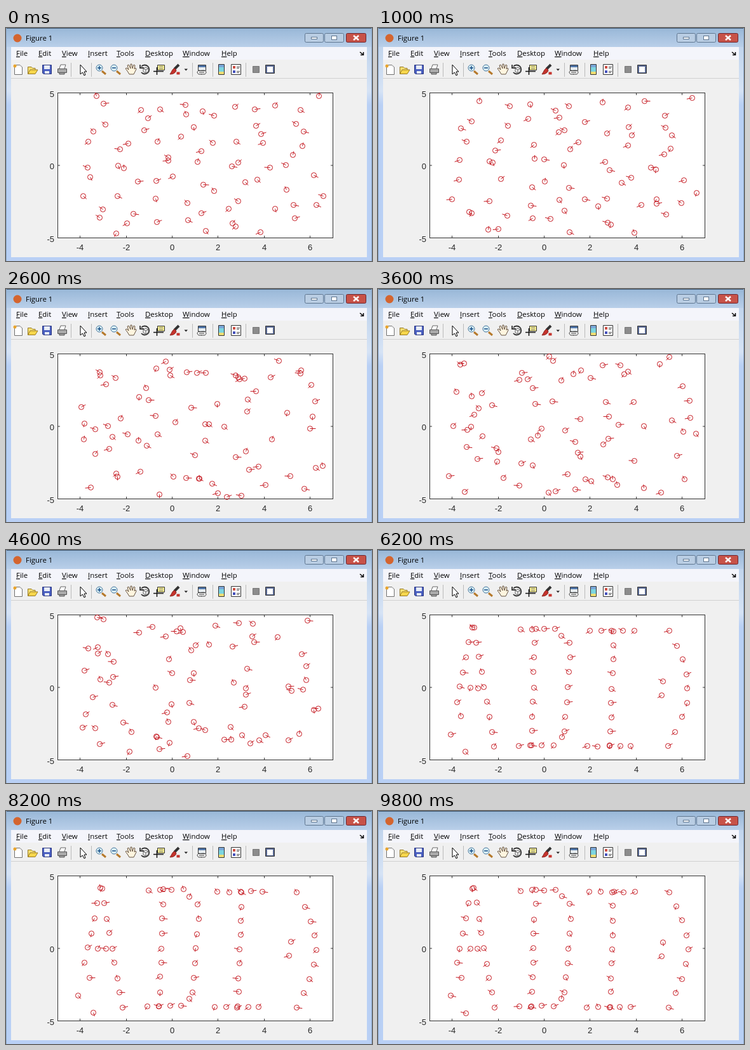
An HTML page for the animation above (10000 ms loop, 576 by 368 pixels).

```html
<!DOCTYPE html>
<html lang="en">
<head>
<meta charset="utf-8">
<title>Figure 1</title>
<style>
  html, body { margin: 0; width: 100%; height: 100%; overflow: hidden; }
  svg { display: block; }
  .ui { font: 11.4px "Open Sans", "Noto Sans", sans-serif; fill: #000; }
  .axis { font: 13px "Liberation Sans", Arial, sans-serif; fill: #262626; }
  .line { fill: none; stroke: #333; }
</style>
</head>
<body>
<svg width="576" height="368" viewBox="0 0 576 368">
  <defs>
    <linearGradient id="bar" x2="0" y2="1">
      <stop stop-color="#98b7d7"/><stop offset="1" stop-color="#b9cfe9"/>
    </linearGradient>
    <linearGradient id="side" x2="0" y2="1">
      <stop stop-color="#b9cfe9"/><stop offset=".27" stop-color="#d6e3f5"/>
      <stop offset=".33" stop-color="#b9d0f5"/><stop offset="1" stop-color="#b9d0f5"/>
    </linearGradient>
  </defs>

  <!-- Window frame -->
  <rect width="576" height="368" fill="url(#side)"/>
  <rect width="576" height="30" fill="url(#bar)"/>
  <path d="M0 .5H576" stroke="#3f566e"/>
  <path d="M.5 0V368M575.5 0V368" stroke="#8ba6c6"/>
  <rect x="8" y="30" width="560" height="332" fill="#f0f0f0"/>
  <rect x="8" y="30" width="560" height="20" fill="#f4f5fb"/>
  <path d="M8 79.5H568" stroke="#d0d0d0"/>
  <circle cx="18" cy="16" r="6.5" fill="#d4652f"/>
  <text class="ui" x="31" y="20">Figure 1</text>
  <g stroke="#5f7690">
    <rect x="470.500" y="8.500" width="29" height="14" rx="2" fill="#b9cde3"/>
    <rect x="501.500" y="8.500" width="30" height="14" rx="2" fill="#b9cde3"/>
    <rect x="535.500" y="8.500" width="31" height="14" rx="2" fill="#c75248" stroke="#6d2630"/>
    <rect x="480.500" y="14.500" width="9" height="3" fill="#fff"/>
    <rect x="512.500" y="12.500" width="8" height="6" fill="#fff"/>
  </g>
  <path d="M547 12L555 19M555 12L547 19" stroke="#fff" stroke-width="2.500"/>
  <g id="menu" class="ui"></g>
  <path d="M557 38L562 42M562.500 38V42.500H558" fill="none" stroke="#000" stroke-width="1.500"/>

  <!-- Toolbar -->
  <path d="M102.500 55V77M134.500 55V77M293.500 55V77M325.500 55V77M377.500 55V77" stroke="#bbb"/>
  <g class="line">
    <path d="M13.500 58.500H22L25.500 62V73.500H13.500Z" fill="#fff" stroke="#707070"/>
    <circle cx="14" cy="60" r="2.500" fill="#e8a52e" stroke="none"/>
    <path d="M34.500 72.500V61.500H40L42 63.500H46V66" fill="#f4df72" stroke="#987923"/>
    <path d="M34.500 72.500L38 66H50L46 72.500Z" fill="#f7d74c" stroke="#987923"/>
    <path d="M57.500 58.500H71.500V72.500H59L57.500 71Z" fill="#4a5fc0" stroke="#2b3780"/>
    <path d="M60 59H69V65H60ZM61 68H68V72H61Z" fill="#e8edf5" stroke="none"/>
    <path d="M84 64L86 58H94L92 64" fill="#fff" stroke="#666"/>
    <path d="M81.500 64.500H95.500V70.500H81.500ZM84 70V73H92V70" fill="#aaa" stroke="#555"/>
    <path d="M117 58V73L120.500 70L123 75L125 74L123 69H127Z" fill="#fff" stroke="#000"/>
    <g id="zooms"></g>
    <path d="M191 68L188 64L190 63L193 66L191 59L193 58L196 64V57H198L199 64L201 58L203 59L202 65L204 63L205 65L201 73H194Z" fill="#fff5df" stroke="#665443"/>
    <path d="M213 61A7 7 0 1 1 213 70M211 58V63H217" stroke="#333" stroke-width="1.800"/>
    <path d="M216 64L220 62L224 64V69L220 71L216 69ZM216 64L220 66L224 64M220 66V71" stroke="#666"/>
    <path d="M238.500 58.500H249.500V66.500H238.500Z" fill="#f5ec8e"/>
    <path d="M241 61H247M241 64H247" stroke="#777"/>
    <path d="M237.500 62V74M232 68.500H248" stroke="#111" stroke-width="1.500"/>
    <path d="M272 58L265 65" stroke="#333" stroke-width="4"/>
    <path d="M266 64Q263 63 260 70L258 73Q266 73 268 67Z" fill="#c5332c" stroke="#8a211c"/>
    <path d="M268.500 69.500H273.500V73.500H268.500Z" fill="#c5332c" stroke="none"/>
    <path d="M280.500 64.500H286L283.250 67.500Z" fill="#222" stroke="none"/>
    <path d="M302.500 58.500H314.500V67.500H302.500Z" fill="#e9eff3"/>
    <path d="M303 60.500H314" stroke="#4f75a8" stroke-width="3"/>
    <path d="M306 67H303Q299 70 303 73H308M307 67H313Q317 70 313 73H307M304 70H312" stroke="#444"/>
    <path d="M334.500 57.500H343.500V73.500H334.500Z" fill="#7cd5e0"/>
    <path d="M335 58H343V62H335Z" fill="#79a7d9" stroke="none"/>
    <path d="M335 69H343V73H335Z" fill="#f0df74" stroke="none"/>
    <path d="M354.500 57.500H369.500V73.500H354.500Z" fill="#fff"/>
    <path d="M357 60H361V64H357Z" fill="#cf5044" stroke="none"/>
    <path d="M357 67H361V71H357Z" fill="#4653bd" stroke="none"/>
    <path d="M363 61.500H368M363 63.500H367M363 68.500H368M363 70.500H367" stroke="#555"/>
    <path d="M388.500 60.500H398.500V70.500H388.500Z" fill="#8c8c8c" stroke="#777"/>
    <path d="M408.500 58.500H422.500V71.500H408.500Z" fill="#5a6a94"/>
    <path d="M411 61H420V70H411Z" fill="#fff" stroke="none"/>
  </g>

  <!-- Plot -->
  <rect x="81.500" y="102.500" width="433" height="229" fill="#fff" stroke="#333"/>
  <g id="ticks"></g>
  <path id="robots" fill="none" stroke="#c4141c"/>
</svg>
<script>
const byId = id => document.getElementById(id);
const menu = { File: 16, Edit: 51, View: 88, Insert: 129, Tools: 174, Desktop: 219, Window: 278, Help: 339 };
byId("menu").innerHTML = Object.entries(menu).map(([word, x]) =>
  `<text x="${x}" y="44"><tspan text-decoration="underline">${word[0]}</tspan>${word.slice(1)}</text>`).join("");

byId("zooms").innerHTML = [147, 170].map((x, i) =>
  `<path d="M${x + 4} 68L${x + 10} 73" stroke="#b5792b" stroke-width="3"/>
   <circle cx="${x}" cy="63" r="5" fill="#d9f0f5" stroke="#4a779d"/>
   <path d="M${x - 3} 63H${x + 3}${i ? "" : `M${x} 60V66`}" stroke="#174d87" stroke-width="1.500"/>`).join("");

let ticks = "";
for (let v = -4; v <= 6; v += 2) {
  const x = Math.round(261 + v * 36.15) + .5;
  ticks += `<path class="line" d="M${x} 102v4M${x} 332v-4"/>
    <text class="axis" x="${x}" y="351" text-anchor="middle">${v}</text>`;
}
for (const v of [5, 0, -5]) {
  const y = 217 - v * 22.9;
  ticks += `<path class="line" d="M81 ${y}h4M515 ${y}h-4"/>
    <text class="axis" x="76" y="${y + 6}" text-anchor="end">${v}</text>`;
}
byId("ticks").innerHTML = ticks;

const PERIOD = 10000, STEP = 200, ARRIVAL = 6200;

const random = (a, b) => {
  const n = Math.sin(a * 127.1 + b * 311.7) * 43758.5453;
  return n - Math.floor(n);
};

// Evenly spaced robots on a straight stroke, or on one that bulges to the right.
const stroke = (count, x1, y1, x2, y2, bulge = 0) => Array.from({ length: count }, (_, i) => {
  const u = i / (count - 1);
  return [x1 + (x2 - x1) * u + bulge * Math.sin(Math.PI * u), y1 + (y2 - y1) * u];
});

const letterA = [
  ...stroke(6, 148, 122, 124, 240), ...stroke(9, 151, 122, 183, 311),
  ...stroke(2, 145, 217, 157, 218), ...stroke(3, 131, 263, 138, 319, -20)];
const letterD = [
  ...stroke(9, 248, 124, 241, 309), ...stroke(4, 225, 126, 279, 124),
  ...stroke(4, 222, 309, 276, 308), ...stroke(2, 289, 135, 301, 147),
  ...stroke(6, 303, 170, 294, 287), [289, 296]];
const letterI = [
  ...stroke(9, 371, 128, 365, 309), ...stroke(5, 333, 128, 404, 127),
  ...stroke(5, 329, 310, 398, 310)];
const smile = [...stroke(9, 458, 128, 457, 310, 30), ...stroke(2, 449, 207, 446, 229)];

const goals = [...letterA, ...letterD, ...letterI, ...smile];
const starts = goals.map((_, i) => [
  115 + 35 * (i % 11 + random(i, 1)),
  104 + 32.5 * (Math.floor(i / 11) + random(i, 2))]);

// Swap starts until every robot has a goal nearby.
const distance = (p, q) => (p[0] - q[0]) ** 2 + (p[1] - q[1]) ** 2;
for (let moved = true; moved;) {
  moved = false;
  for (let i = 0; i < goals.length; i++) for (let j = 0; j < i; j++) {
    const kept = distance(starts[i], goals[i]) + distance(starts[j], goals[j]);
    const swapped = distance(starts[i], goals[j]) + distance(starts[j], goals[i]);
    if (swapped < kept - 1e-6) {
      [starts[i], starts[j]] = [starts[j], starts[i]];
      moved = true;
    }
  }
}

// Robots head for their goals on curved paths, then shiver in place.
function position(i, tick) {
  const u = Math.min(1, tick * STEP / ARRIVAL);
  const turn = 2 * Math.PI * (random(i, 3) + 1.5 * u);
  const sway = 18 * Math.sin(Math.PI * u);
  const curve = [Math.cos(turn), Math.sin(turn)];
  return goals[i].map((goal, axis) => {
    const shake = 2 * (random(i + 80 * axis, tick) - .5);
    return goal + (starts[i][axis] - goal) * (1 - u) + sway * curve[axis] + shake;
  });
}

function draw(now) {
  const tick = Math.floor(now % PERIOD / STEP);
  let path = "";
  goals.forEach((_, i) => {
    const [x, y] = position(i, tick).map(v => Math.floor(v) + .5);
    if (x < 81 || x > 515 || y < 102 || y > 332) return;
    const heading = random(i, tick + 99) * 2 * Math.PI;
    const dx = 9 * Math.cos(heading), dy = 5.75 * Math.sin(heading);
    path += `M${x - 4} ${y}a4 4 0 1 0 8 0a4 4 0 1 0-8 0M${x} ${y}l${dx} ${dy}`;
  });
  byId("robots").setAttribute("d", path);
  requestAnimationFrame(draw);
}
draw(performance.now());
</script>
</body>
</html>
```
